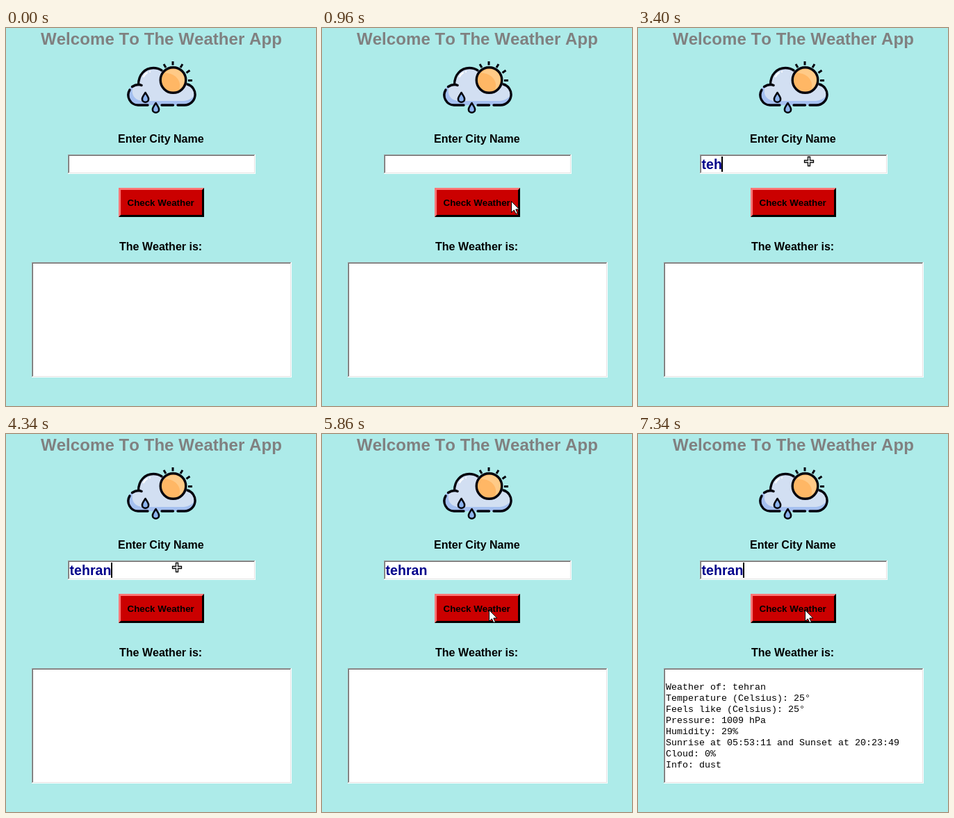
Recreate the animation shown at these times as an HTML page. Size 446 by 544 pixels, loop 7.67 s.

```html
<!DOCTYPE html>
<html lang="en">
<head>
<meta charset="utf-8">
<title>Weather App</title>
<style>
html, body { margin: 0; width: 100%; height: 100%; overflow: hidden; background: #adebe9; }
svg { display: block; width: 446px; height: 544px; }
text { font-family: "Liberation Sans", Arial, sans-serif; font-weight: bold; font-kerning: none; white-space: pre; }
#report text { font: 13.333px "Liberation Mono", "Courier New", monospace; }
.ink { fill: none; stroke: #04040e; stroke-width: 3.4; stroke-linecap: round; stroke-linejoin: round; }
.drop { fill: #8db4ee; stroke: #04040e; stroke-width: 2.6; stroke-linejoin: round; }
.lit { fill: #ff7676; }
.dark { fill: #000; }
</style>
</head>
<body>
<svg viewBox="0 0 446 544">
  <defs>
    <path id="drop" class="drop" d="M0-7C2-3.5 4.6-1 4.6 2.2A4.6 4.6 0 0 1-4.6 2.2C-4.6-1-2-3.5 0-7Z"/>
    <path id="edge" d="M0 0H123L120 3H3V39L0 42Z"/>
  </defs>
  <rect width="446" height="544" fill="#adebe9"/>
  <text x="50" y="24" font-size="24" letter-spacing=".06" fill="#808080">Welcome To The Weather App</text>

  <g id="icon">
    <path fill="#d2dff2" d="M190 111A15 15 0 0 1 190 81C190 67 200 57 212 57C219 57 224 59 229 64L258 80A15.500 15.500 0 0 1 257 111Z"/>
    <path fill="#a5c0f0" d="M190 111A15 15 0 0 1 184 82C178 93 184 104 196 105H256C264 104 270 100 272 95A15.500 15.500 0 0 1 257 111Z"/>
    <path class="ink" d="M204 111H190A14.500 14.500 0 0 1 178 89M181.500 84.500Q186 81.500 190.500 81.500C190.500 67 200 57.500 212 57.500Q219 57.500 224 61"/>
    <path class="ink" d="M261 81A15.300 15.300 0 0 1 257 111H247M240.500 111H224M190.500 81.500Q193 81.500 195 82.500"/>
    <g fill="none" stroke="#fff" stroke-width="2" stroke-linecap="round">
      <path d="M198 70Q200 66 203 64.500M207 63h.1"/>
    </g>
    <circle class="ink" cx="240.500" cy="75" r="18.300" style="fill:#ffb765"/>
    <path fill="#ffca87" d="M229 65A15.500 15.500 0 1 1 249 88C254 77 243 64 229 65Z"/>
    <path class="ink" style="stroke-width:3;stroke-linecap:butt" d="M240 48V53.500M227 52L230 57M254 52L251 57M264.500 61L259.500 64.500M262 75.500H268"/>
    <use href="#drop" x="200.500" y="100"/>
    <use href="#drop" x="215.500" y="115"/>
  </g>

  <text x="161" y="165" font-size="16">Enter City Name</text>
  <g id="fields"></g>
  <text id="entry" x="91.500" y="203" font-size="19.600" fill="#00008b"></text>
  <rect id="caret" y="185" width="2" height="22"/>

  <g transform="translate(162 230)">
    <rect id="shade" class="dark" width="123" height="42"/>
    <use id="light" class="lit" href="#edge"/>
    <rect x="3" y="3" width="117" height="36" fill="#cb0000"/>
    <text id="label" x="12.500" y="26" font-size="13.333">Check Weather</text>
  </g>

  <text x="163" y="320" font-size="16">The Weather is:</text>
  <g id="report"></g>

  <path id="arrow" d="M.5.5V16.500L4.300 13L7 18.500L9.300 17.500L6.800 12H11.800Z" fill="#fff" stroke="#000"/>
  <path id="cross" d="M-1.500-6.500H1.500V-1.500H6.500V1.500H1.500V6.500H-1.500V1.500H-6.500V-1.500H-1.500Z" fill="#fff" stroke="#000" stroke-width="1.300"/>
</svg>
<script>
const LOOP = 7670;
const CITY = 'tehran';
const keyTimes = [2650, 3200, 3330, 3600, 3730, 4340];
const caretX = [91, 97, 108, 120, 128, 139, 151];
const blinks = [1570, 2170, 2520, 3070, 3400, 3990, 4270, 4930, 5200, 5860, 6460, 7060, 7340];
const press = [5930, 6000];
const reportTime = 6460;

// Pointer glides in from the bottom edge, one step per tick.
const entryPath = [
  [370, 538], [365, 536], [358, 533], [345, 524], [328, 512], [312, 498],
  [306, 478], [304, 450], [303, 420], [302, 390], [302, 360], [303, 333]
];
const moves = entryPath.map(([x, y], i) => [130 + Math.round(i * 760 / 11), x, y, 'arrow']).concat([
  [960, 272, 249, 'arrow'], [1030, 259, 228, 'arrow'], [1100, 251, 211, 'arrow'],
  [1170, 248, 196, 'cross'], [1240, 246, 192, 'cross'], [1570, 250, 187, 'cross'],
  [1640, 246, 192, 'cross'], [5000, 247, 190, 'cross'], [5350, 245, 195, 'cross'],
  [5430, 242, 203, 'cross'], [5500, 238, 222, 'arrow'], [5570, 239, 243, 'arrow'],
  [5640, 240, 253, 'arrow']
]);

const lines = [
  'Weather of: ' + CITY,
  'Temperature (Celsius): 25°',
  'Feels like (Celsius): 25°',
  'Pressure: 1009 hPa',
  'Humidity: 29%',
  'Sunrise at 05:53:11 and Sunset at 20:23:49',
  'Cloud: 0%',
  'Info: dust'
];

const $ = id => document.getElementById(id);
const show = (el, on) => el.setAttribute('visibility', on ? 'visible' : 'hidden');
const passed = (times, t) => times.filter(at => at <= t).length;

function sunken(x, y, w, h) {
  const box = (inset, far, color) =>
    `<rect x="${x + inset}" y="${y + inset}" width="${w - inset - far}" height="${h - inset - far}" fill="${color}"/>`;
  return box(0, 0, '#fff') + box(0, 1, '#a0a0a0') + box(1, 1, '#e3e3e3') +
    box(1, 2, '#696969') + box(2, 2, '#fff');
}

$('fields').innerHTML = sunken(89, 182, 270, 28) + sunken(37, 337, 374, 166);
$('report').innerHTML = lines.map((s, i) => `<text x="40" y="${368 + i * 16}">${s}</text>`).join('');

function draw() {
  const t = performance.now() % LOOP;

  const typed = passed(keyTimes, t);
  $('entry').textContent = CITY.slice(0, typed);
  $('caret').setAttribute('x', caretX[typed]);
  show($('caret'), passed(blinks, t) % 2);

  const down = t >= press[0] && t < press[1];
  $('shade').setAttribute('class', down ? 'lit' : 'dark');
  $('light').setAttribute('class', down ? 'dark' : 'lit');
  $('label').setAttribute('transform', down ? 'translate(1 1)' : '');
  show($('report'), t >= reportTime);

  const move = moves[passed(moves.map(m => m[0]), t) - 1];
  for (const id of ['arrow', 'cross']) {
    const on = move && move[3] === id;
    show($(id), on);
    if (on) $(id).setAttribute('transform', `translate(${move[1]} ${move[2]})`);
  }
  requestAnimationFrame(draw);
}
draw();
</script>
</body>
</html>
```
